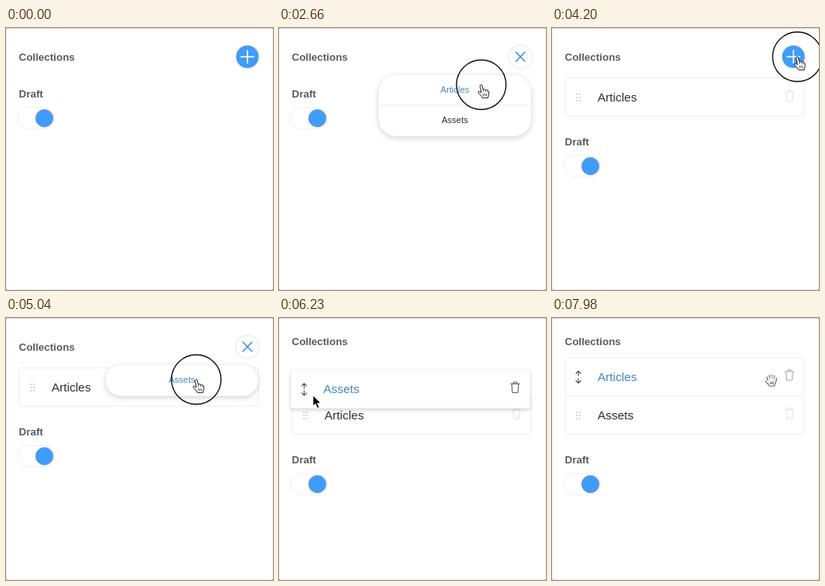
These frames come from a looping animation (334 px wide and 328 px high, 8 s). An HTML page:

```html
<!DOCTYPE html>
<html lang="en">
<head>
<meta charset="utf-8">
<title>Collections</title>
<style>
  html, body { margin: 0; width: 100%; height: 100%; overflow: hidden; background: #fff; }
  svg { display: block; width: 100vw; height: 100vh; }
  text { font-family: "Liberation Sans", Arial, sans-serif; fill: #2e3033; }
  .label { font-size: 13px; font-weight: bold; fill: #5a5d66; }
  .row text { font-size: 15px; }
  .row rect { fill: #fff; stroke: #efeff0; }
  .row .arrows { display: none; stroke: #505257; stroke-width: 1.1; }
  .row .trash { stroke: #e2e2e4; }
  .row .dots { fill: #d6d6d8; }
  .row.hover text, .menu .hover { fill: #4389bd; }
  .row.hover .arrows { display: inline; }
  .row.hover .dots { display: none; }
  .row.hover .trash { stroke: #a6a7ac; }
  .row.drag rect { stroke: #f3f3f4; filter: drop-shadow(0 2px 2px rgba(0,0,0,.17)); }
  .row.drag .trash { stroke: #4d4f54; }
  .menu text { font-size: 11px; text-anchor: middle; }
  .menu rect { fill: #fff; stroke: #f1f1f3; filter: drop-shadow(0 2px 3px rgba(40,45,70,.2)); }
  .shade { filter: drop-shadow(0 .5px 1px rgba(60,65,100,.3)); }
  .line { fill: none; stroke-linecap: round; stroke-linejoin: round; }
  .cursor path { stroke-linejoin: round; stroke-linecap: round; }
  .outline { fill: #fff; stroke: #222; stroke-width: 1; }
  .fold { fill: none; stroke: #333; stroke-width: .8; }
  .solid { fill: #000; stroke: #fff; stroke-width: 1; }
  .back { fill: #333; stroke: #333; stroke-width: 3.9; }
  .front { fill: #fff; stroke: #fff; stroke-width: 2.3; }
</style>
</head>
<body>
<svg viewBox="0 0 334 328" preserveAspectRatio="none">
  <defs>
    <path id="palm" d="M-6 .6L-3 4.6M-3.8 -4L-2 2M-.6 -6L0 2M2.6 -5.4L2.2 2M5.6 -2.6L4.2 3M-3 2.6L-1.4 6.6H3L4.4 2.6Z"/>
    <g id="icons">
      <path class="line trash" d="M291.5 17H302.5M292.7 17.5L293.6 28H300.4L301.3 17.5M295 16.7V14.9H299V16.7"/>
      <path class="line arrows" d="M33 22.5V16.5M30 19.5L33 16.5L36 19.5M33 25.5V31.5M30 28.5L33 31.5L36 28.5"/>
      <path class="dots" d="M30 19h2v2h-2zm4 0h2v2h-2zm-4 4h2v2h-2zm4 0h2v2h-2zm-4 4h2v2h-2zm4 0h2v2h-2z"/>
    </g>
  </defs>

  <rect width="334" height="328" fill="#a4a4a4"/>
  <rect width="334" height="328" rx="3" fill="#fff"/>
  <path d="M2 .5H332" stroke="#d4d4d4"/>
  <path d="M333.5 2V326M.5 2V326M2 327.5H332" stroke="#efefef"/>

  <text id="title" class="label" x="16">Collections</text>

  <g id="draft">
    <text class="label" x="16" y="87">Draft</text>
    <rect x="14.5" y="99.5" width="46" height="27" rx="13.5" fill="#fff" stroke="#f1f1f2"/>
    <circle class="shade" cx="48" cy="113" r="10.7" fill="#409cfb" stroke="#5d8fd0" stroke-width=".8"/>
  </g>

  <g id="articles" class="row">
    <rect x="16.5" y="-.5" width="299" height="48" rx="2"/>
    <text x="57" y="29">Articles</text>
    <use href="#none"/>
  </g>
  <g id="assets" class="row">
    <rect x="16.5" y="-.5" width="299" height="48" rx="2"/>
    <text x="57" y="29">Assets</text>
  </g>

  <g id="menu" class="menu">
    <rect id="panel" x="124.5" y="58.5" width="191"/>
    <g id="first">
      <path d="M125 96.5H315" stroke="#ededf0"/>
      <text id="pickArticles" x="220" y="81">Articles</text>
    </g>
    <text id="pickAssets" x="220">Assets</text>
  </g>

  <g id="button" transform="translate(302 36)">
    <circle id="disc" class="shade" r="14"/>
    <path id="plus" class="line" d="M-8 0H8M0 -8V8" stroke-width="1.5"/>
  </g>

  <circle id="ring" r="31" fill="none" stroke="#111" stroke-width="1.4"/>

  <g id="cursor" class="cursor">
    <path id="arrow" class="solid" d="M1 -1V12.2L4.1 9.4L6.6 15L9 14L6.6 8.6H10.8Z"/>
    <g id="hand">
      <path class="outline" d="M-1.4 1Q-1 -.6 .4 0L1.2 1L2.3 6Q4 5 5 6.4Q6.8 5.6 7.6 7.2Q9.2 6.8 9.4 8.6L9.6 11.4L8.4 16.4H1.4L0 14L-3.6 10Q-4.2 8.2 -2.6 8.2L-.2 9.8Z"/>
      <path class="fold" d="M2.3 6L2.8 8.6M5 6.4L5.4 8.6M7.6 7.2L7.8 9M2.6 11.4V14M4.6 11.4V14M6.6 11.4V14"/>
    </g>
    <g id="grab">
      <use href="#palm" class="back"/>
      <use href="#palm" class="front"/>
      <path class="fold" d="M-.8 3V5.6M1 3V5.6M2.8 3V5.6"/>
    </g>
  </g>
</svg>

<script>
const LOOP = 8000, STEP = 70;
const $ = id => document.getElementById(id);
const show = (id, on) => { $(id).style.display = on ? 'inline' : 'none'; };
const place = (id, x, y) => $(id).setAttribute('transform', `translate(${x.toFixed(2)} ${y.toFixed(2)})`);
const clamp = v => Math.min(1, Math.max(0, v));
const ease = v => v * v * (3 - 2 * v);
const mix = (a, b, k) => a + (b - a) * k;

// Mouse presses, and what follows from them
const press = { open1: 1680, pick1: 2660, open2: 4130, pick2: 5040, lift: 5880 };
const menus = [[press.open1 + 280, press.pick1 + 210], [press.open2 + 280, press.pick2 + 210]];
const [added1, added2] = menus.map(m => m[1]);
const dragStart = 6090, dragEnd = 6930;

// Each move: start, end, destination
const entry = [172, 273];
const moves = [
  [280, 420, 244, 100],
  [560, 980, 297, 37.5],
  [2240, 2520, 253, 71],
  [3430, 3640, 316, 44],
  [3850, 4060, 307, 36],
  [4620, 4830, 238, 77],
  [5250, 5530, 60, 99],
  [5530, 5810, 43, 81],
  [6020, 6580, 38, 135],
  [7210, 7980, 274, 77]
];

function pointer(t) {
  let [x, y] = entry;
  for (const [from, to, tx, ty] of moves) {
    const k = ease(clamp((t - from) / (to - from)));
    x = mix(x, tx, k);
    y = mix(y, ty, k);
  }
  return [x, y];
}

function rowTops(t) {
  if (t < added1) return {};
  if (t < added2) return { articles: 63 };
  const swap = ease(clamp((t - 6230) / 210));
  return { articles: mix(98, 50, swap), assets: t < dragStart ? 50 : 98 };
}

function drawRow(id, top, lifted, x, y, hover) {
  show(id, top !== undefined);
  if (top === undefined) return;
  if (lifted) place(id, x - 43, 50 + (y - 81) * .9);
  else place(id, 0, top);
  $(id).classList.toggle('drag', lifted);
  $(id).classList.toggle('hover', hover);
}

function drawMenu(t, menu, x, y) {
  show('menu', !!menu);
  if (!menu) return false;
  const two = menu === menus[0], bottom = two ? 135 : 97;
  const over = x > 124 && x < 316 && y > 58 && y < bottom;
  $('menu').style.opacity = clamp(.5 + Math.min(t - menu[0], menu[1] - STEP - t) / 140);
  $('panel').setAttribute('height', bottom - 58);
  $('panel').setAttribute('rx', two ? 22 : 19);
  show('first', two);
  $('pickAssets').setAttribute('y', two ? 119 : 81);
  $('pickArticles').classList.toggle('hover', over && two);
  $('pickAssets').classList.toggle('hover', over && !two);
  return over;
}

function draw(t) {
  const [x, y] = pointer(t), [lateX, lateY] = pointer(t - STEP);
  const menu = menus.find(([a, b]) => t >= a && t < b);
  const count = (t >= added1) + (t >= added2);
  const drag = t >= dragStart && t < dragEnd;

  $('title').setAttribute('y', count === 2 ? 34 : 41);
  place('draft', 0, [0, 60, 95][count]);

  const tops = rowTops(t);
  const inside = (top, px, py) => px > 16 && px < 316 && py >= top && py < top + 48;
  for (const id of ['articles', 'assets']) {
    const lifted = drag && id === 'assets';
    const hover = lifted || (!drag && !menu && inside(tops[id], lateX, lateY));
    drawRow(id, tops[id], lifted, x, y, hover);
  }

  const overMenu = drawMenu(t, menu, x, y);

  const room = count < 2;
  const overButton = room && Math.hypot(x - 302, y - 36) < 14;
  const hot = overButton && t < menus[0][0];
  show('button', room);
  $('disc').setAttribute('fill', menu ? '#fff' : hot ? '#58a8f3' : '#409cf5');
  $('plus').setAttribute('stroke', menu ? '#3a8ddd' : '#fff');
  $('plus').setAttribute('transform', menu ? 'rotate(45)' : '');

  show('ring', Object.values(press).some(p => t >= p && t < p + 140));
  place('ring', x, y);

  const overRow = Object.values(tops).some(top => inside(top, x, y));
  const kind = drag ? 'arrow' : overButton || overMenu ? 'hand' : overRow ? 'grab' : 'arrow';
  show('cursor', t >= moves[0][0]);
  place('cursor', x, y);
  for (const id of ['arrow', 'hand', 'grab']) show(id, id === kind);
}

// Both rows share the same icons
for (const row of document.querySelectorAll('.row')) {
  row.querySelector('use')?.remove();
  for (const icon of $('icons').children) row.append(icon.cloneNode());
}

const start = performance.now();
function frame() {
  const t = (performance.now() - start) % LOOP;
  draw(Math.floor(t / STEP) * STEP);
  requestAnimationFrame(frame);
}
frame();
</script>
</body>
</html>
```
